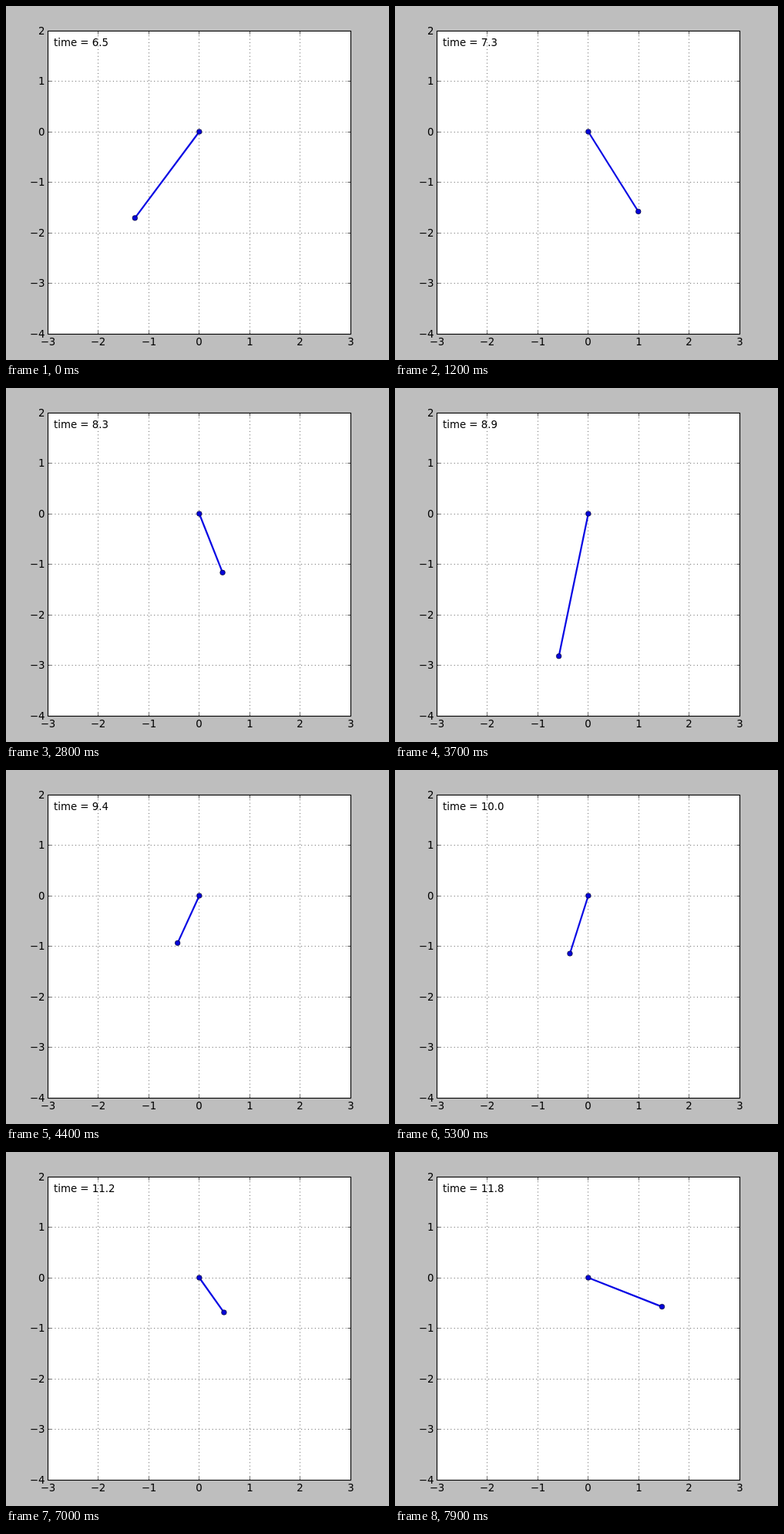
Animation of 497 by 459 pixels, one loop 8 s. Source, as an HTML page with a canvas:

```html
<!DOCTYPE html>
<html lang="en">
<head>
<meta charset="utf-8">
<title>Elastic pendulum</title>
<style>
  html, body { margin: 0; width: 100%; height: 100%; overflow: hidden; background: #bebebe; }
  canvas { display: block; }
</style>
</head>
<body>
<canvas id="stage" width="497" height="459"></canvas>
<script>
const ctx = document.getElementById('stage').getContext('2d');
const LEFT = 54, TOP = 32, SIZE = 393, UNIT = 65.5;
const OX = 250.8, OY = 163;
const STEPS = 80, STEP_MS = 100, DT = 40 / 599, FIRST = 97;
const G = 9.8, SUB = 4;

// Observed bob positions: step, x, y in pixels
const POINTS = [
  [0, 168, 275.6], [12, 315.9, 265.8], [28, 280.8, 238.9], [37, 213.6, 347.6],
  [53, 226.9, 236], [62, 234.7, 350.6], [79, 347.8, 202]
];
// Furthest reach per stretch: axis, first step, last step, pixels
const REACH = [
  [0, 0, 9, 274], [1, 0, 9, 331], [0, 9, 18, 347], [1, 9, 18, 310],
  [0, 18, 27, 346], [0, 27, 36, 288], [1, 36, 45, 353], [1, 45, 54, 258],
  [0, 63, 72, 296], [1, 63, 72, 335], [1, 72, 79, 202]
];

// Spring pendulum, p = [x, y, vx, vy, stiffness / mass, rest length]
function simulate([x, y, vx, vy, k, rest]) {
  const path = [], h = DT / SUB;
  const pull = (x, y) => k * (rest / Math.sqrt(x * x + y * y) - 1);
  for (let i = 0; i < STEPS; i++) {
    path.push([OX + x * UNIT, OY - y * UNIT]);
    for (let j = 0; j < SUB; j++) {
      const f1 = pull(x, y), ax1 = f1 * x, ay1 = f1 * y - G;
      const vx2 = vx + ax1 * h / 2, vy2 = vy + ay1 * h / 2;
      const x2 = x + vx * h / 2, y2 = y + vy * h / 2;
      const f2 = pull(x2, y2), ax2 = f2 * x2, ay2 = f2 * y2 - G;
      const vx3 = vx + ax2 * h / 2, vy3 = vy + ay2 * h / 2;
      const x3 = x + vx2 * h / 2, y3 = y + vy2 * h / 2;
      const f3 = pull(x3, y3), ax3 = f3 * x3, ay3 = f3 * y3 - G;
      const vx4 = vx + ax3 * h, vy4 = vy + ay3 * h;
      const x4 = x + vx3 * h, y4 = y + vy3 * h;
      const f4 = pull(x4, y4), ax4 = f4 * x4, ay4 = f4 * y4 - G;
      x += h / 6 * (vx + 2 * vx2 + 2 * vx3 + vx4);
      y += h / 6 * (vy + 2 * vy2 + 2 * vy3 + vy4);
      vx += h / 6 * (ax1 + 2 * ax2 + 2 * ax3 + ax4);
      vy += h / 6 * (ay1 + 2 * ay2 + 2 * ay3 + ay4);
    }
  }
  return path;
}

function errors(p) {
  const path = simulate(p), out = [];
  for (const [i, x, y] of POINTS) out.push(path[i][0] - x, path[i][1] - y);
  for (const [axis, a, b, v] of REACH) {
    let m = -1e9;
    for (let i = a; i <= b; i++) m = Math.max(m, path[i][axis]);
    out.push(0.4 * (m - v));
  }
  return out;
}

const cost = e => e.reduce((s, v) => s + v * v, 0);

// Gaussian elimination with pivoting
function solve(A, b) {
  const n = b.length, M = A.map((row, i) => [...row, b[i]]);
  for (let c = 0; c < n; c++) {
    let top = c;
    for (let r = c + 1; r < n; r++) if (Math.abs(M[r][c]) > Math.abs(M[top][c])) top = r;
    [M[c], M[top]] = [M[top], M[c]];
    for (let r = 0; r < n; r++) {
      if (r === c) continue;
      const f = M[r][c] / M[c][c];
      for (let q = c; q <= n; q++) M[r][q] -= f * M[c][q];
    }
  }
  return M.map((row, i) => row[n] / row[i]);
}

// Levenberg-Marquardt
function refine(p, rounds) {
  let e = errors(p), best = cost(e), damp = 0.1;
  for (let n = 0; n < rounds; n++) {
    const J = p.map((v, j) => {
      const q = p.slice();
      q[j] += 1e-5;
      return errors(q).map((w, i) => (w - e[i]) / 1e-5);
    });
    const dot = (a, b) => a.reduce((s, v, i) => s + v * b[i], 0);
    const A = J.map((a, i) => J.map((b, j) => dot(a, b) * (i === j ? 1 + damp : 1)));
    const step = solve(A, J.map(a => -dot(a, e)));
    const q = p.map((v, i) => v + step[i]);
    const eq = errors(q), c = cost(eq);
    if (c < best) { p = q; e = eq; best = c; damp *= 0.3; }
    else damp *= 4;
  }
  return { p, best };
}

function fit() {
  let seed = 7;
  const rand = (a, b) => {
    seed = (seed * 16807) % 2147483647;
    return a + (b - a) * seed / 2147483647;
  };
  const x = (POINTS[0][1] - OX) / UNIT, y = (OY - POINTS[0][2]) / UNIT;
  const tries = [];
  for (let i = 0; i < 3000; i++) {
    const p = [x, y, rand(1, 4), rand(-5.5, -2.5), rand(11, 26), rand(0.8, 1.6)];
    tries.push({ p, best: cost(errors(p)) });
  }
  tries.sort((a, b) => a.best - b.best);
  const short = tries.slice(0, 12).map(t => refine(t.p, 25));
  short.sort((a, b) => a.best - b.best);
  return refine(short[0].p, 25).p;
}

const path = simulate(fit());

function stroke(x1, y1, x2, y2) {
  ctx.beginPath();
  ctx.moveTo(x1, y1);
  ctx.lineTo(x2, y2);
  ctx.stroke();
}

function label(text, x, y, align) {
  ctx.textAlign = align;
  ctx.fillText(text, x, y);
}

const num = n => (n < 0 ? '\u2212' : '') + Math.abs(n);

function drawAxes() {
  const L = LEFT + 0.5, T = TOP + 0.5, R = L + SIZE, B = T + SIZE;
  ctx.fillStyle = '#bebebe';
  ctx.fillRect(0, 0, 497, 459);
  ctx.fillStyle = '#fff';
  ctx.fillRect(L, T, SIZE, SIZE);
  ctx.strokeStyle = ctx.fillStyle = '#000';
  ctx.font = '13.33px "DejaVu Sans", sans-serif';
  for (let i = 0; i <= 6; i++) {
    const d = Math.round(i * UNIT - 0.01), x = L + d, y = T + d;
    ctx.lineWidth = 0.556;
    if (i > 0 && i < 6) {
      ctx.setLineDash([1.11, 3.33]);
      stroke(x, B, x, T);
      stroke(L, y, R, y);
      ctx.setLineDash([]);
      stroke(x, B, x, B - 4.4);
      stroke(x, T, x, T + 4.4);
      stroke(L, y, L + 4.4, y);
      stroke(R, y, R - 4.4, y);
    }
    label(num(i - 3), x, 440, 'center');
    label(num(2 - i), 50.5, y + 4.5, 'right');
  }
  ctx.lineWidth = 1.11;
  ctx.strokeRect(L, T, SIZE, SIZE);
}

function dot(x, y) {
  ctx.beginPath();
  ctx.arc(x, y, 3.33, 0, Math.PI * 2);
  ctx.fill();
  ctx.stroke();
}

function draw(i) {
  const [x, y] = path[i];
  drawAxes();
  label('time = ' + ((FIRST + i) * DT).toFixed(1), 62, 52, 'left');
  ctx.strokeStyle = '#0808e4';
  ctx.lineWidth = 2.22;
  stroke(OX, OY, x, y);
  ctx.fillStyle = '#0404d8';
  ctx.strokeStyle = '#000';
  ctx.lineWidth = 0.556;
  dot(OX, OY);
  dot(x, y);
}

const start = performance.now();
function tick() {
  const ms = Math.max(0, performance.now() - start);
  draw(Math.floor(ms / STEP_MS) % STEPS);
  requestAnimationFrame(tick);
}
tick();
</script>
</body>
</html>
```
